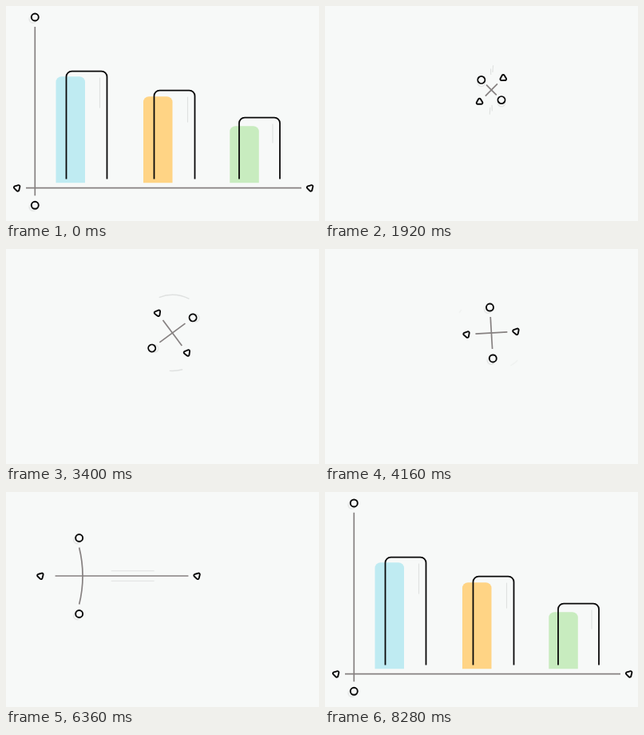
An HTML page with a canvas that plays this animation: 392x269 px, repeating every 8320 ms.

```html
<!DOCTYPE html>
<html lang="en">
<head>
<meta charset="utf-8">
<title>Bar chart loop</title>
<style>
html, body { margin: 0; width: 100%; height: 100%; overflow: hidden; background: #f7f9f8; }
canvas { display: block; width: 392px; height: 269px; }
</style>
</head>
<body>
<canvas id="stage"></canvas>
<script>
const W = 392, H = 269, LOOP = 8320, PX = 208.4, PY = 105;
const LAG = 20; // the lines follow their end marks by this many ms
const BG = '#f7f9f8', INK = '#080808', AXIS = '#868181', PALE = '#dfe1e0';
const rad = deg => deg * Math.PI / 180;

const canvas = document.getElementById('stage');
const ctx = canvas.getContext('2d');
const dpr = window.devicePixelRatio || 1;
canvas.width = W * dpr;
canvas.height = H * dpr;
ctx.scale(dpr, dpr);
ctx.lineJoin = 'round';

const clamp = u => Math.max(0, Math.min(1, u));
const part = (t, from, to) => clamp((t - from) / (to - from));
const sine = u => (1 - Math.cos(Math.PI * u)) / 2;
const swing = u => sine(u) + u * Math.sin(Math.PI * u) ** 2 / 2; // overshoots, then settles
const pulse = (t, from, to) => clamp(3 * Math.sin(Math.PI * part(t, from, to)));

// Poses: ends of both axes, where they cross, rotation, and the bars' lift off the axis.
const chart = { left: 14, right: 381, y: 227.6, x: 36.3, up: 14, down: 249.3, turn: 0, lift: 1 };
const cross = (h, v, shift = 0) =>
  ({ left: PX - h, right: PX + h, y: PY, x: PX + shift, up: PY - v, down: PY + v });

const phases = [
  [650, 950, { lift: 0 }, sine],
  [1000, 1920, cross(21, 17.8), sine],
  [1550, 1920, { turn: -45 }, sine],
  [1920, 2400, cross(31, 32), sine],
  [1920, 4300, { turn: 360 }, sine],
  [4480, 5080, { ...cross(31, 40.5, 17.8), turn: 374 }, sine],
  [5080, 5450, { ...cross(31, 47.5, 19), turn: 360 }, sine],
  [5900, 6760, { left: chart.left }, swing],
  [5900, 6858, { x: chart.x }, swing],
  [7000, 7540, { right: 387, y: 234, down: 255 }, sine],
  [7540, 8300, { ...chart, turn: 360 }, swing]
];

function poseAt(t) {
  const pose = { ...chart };
  for (const [from, to, goal, ease] of phases) {
    if (t <= from) continue;
    const k = ease(part(t, from, to));
    for (const key in goal) pose[key] += (goal[key] - pose[key]) * k;
  }
  return pose;
}

const bars = [
  { x: 62.5, ox: 75.5, color: '#bfebf2', fill: 133, line: 135, glint: 38 },
  { x: 172, ox: 185.5, color: '#ffd485', fill: 108, line: 111, glint: 32 },
  { x: 280.3, ox: 292, color: '#c8ecbf', fill: 71, line: 77, glint: 24 }
];

const barScale = (t, delay) => t < LOOP / 2
  ? 1 - sine(part(t - delay, 650, 1030))
  : swing(part(t - delay, 7000, 7700));

function stroke(color, width) {
  ctx.strokeStyle = color;
  ctx.lineWidth = width;
  ctx.stroke();
}

function line(x1, y1, x2, y2, color = PALE, width = 1.1) {
  ctx.beginPath();
  ctx.moveTo(x1, y1);
  ctx.lineTo(x2, y2);
  stroke(color, width);
}

function faint(alpha, draw) {
  if (alpha < .01) return;
  ctx.globalAlpha = alpha;
  draw();
  ctx.globalAlpha = 1;
}

function mark() {
  ctx.fillStyle = BG;
  ctx.fill();
  stroke(INK, 1.9);
}

function ring(x, y) {
  ctx.beginPath();
  ctx.arc(x - 2.5, y + 2.5, 4.6, 0, 7);
  stroke('#e6e8e7', 1.6);
  ctx.beginPath();
  ctx.arc(x, y, 4.5, 0, 7);
  mark();
}

function triangle(x, y) {
  const corner = i => [x + 5.8 * Math.cos(rad(120 * i - 166)), y + 5.8 * Math.sin(rad(120 * i - 166))];
  const [ax, ay] = corner(0), [bx, by] = corner(1);
  ctx.beginPath();
  ctx.moveTo((ax + bx) / 2, (ay + by) / 2);
  for (let i = 1; i <= 3; i++) ctx.arcTo(...corner(i), ...corner(i + 1), 1.6);
  ctx.closePath();
  mark();
}

function arch(x, w, y, h) {
  const r = Math.min(7, h);
  ctx.beginPath();
  ctx.moveTo(x, y);
  ctx.arcTo(x, y - h, x + r, y - h, r);
  ctx.arcTo(x + w, y - h, x + w, y, r);
  ctx.lineTo(x + w, y);
}

function drawBar(bar, i, t, { y, lift }) {
  const fill = bar.fill * barScale(t, 60 * i);
  const high = bar.line * barScale(t, 60 * i - 20);
  if (fill > .5) {
    arch(bar.x, 36.5, y - 4 - 2.3 * lift, fill);
    ctx.fillStyle = bar.color;
    ctx.fill();
  }
  if (high < 1) return;
  const base = y - 4 - 7 * lift, x = bar.ox + 42;
  arch(bar.ox, 51, base, high);
  stroke(INK, 1.8);
  const from = base - high + 36 - 28 * lift;
  const to = Math.min(base, from + bar.glint * (.36 + .64 * lift));
  if (from < to) line(x, from, x, to);
}

function drawTrails(t, { x, y, turn }) {
  faint(pulse(t, 1560, 2250), () => {
    for (let i = 0; i < 4; i++) {
      const a = rad(90 * i - (i % 2 ? 176 : 92)), near = i % 2 ? 22 : 19, far = near * 1.4;
      line(PX + near * Math.cos(a), PY + near * Math.sin(a), PX + far * Math.cos(a), PY + far * Math.sin(a));
    }
  });
  const spin = pulse(t, 2250, 4220);
  faint(spin, () => {
    for (const [end, size] of [[63, 47], [221, 20]]) {
      ctx.beginPath();
      ctx.arc(PX, PY, 47.5, rad(turn + end - size * spin), rad(turn + end));
      stroke(PALE, 1.4);
    }
  });
  faint(pulse(t, 6080, 6650), () => {
    for (const side of [-6.2, 6.2]) line(x + 40, PY + side, x + 94, PY + side);
  });
  faint(pulse(t, 7080, 7650), () => {
    for (const side of [-5.5, 5]) line(x + side, y - 79, x + side, y - 7);
  });
}

function drawAxes(t, pose) {
  const { left, right, y, x, up, down, turn } = pose, late = poseAt(t - LAG);
  const gapH = Math.min(11, (right - left) / 4), gapV = Math.min(12, (down - up) / 4);
  ctx.save();
  ctx.translate(PX, PY);
  ctx.rotate(rad(turn));
  ctx.translate(-PX, -PY);
  faint(pulse(t, 4600, 5300), () => line(x - 15, PY + 30, x - 3.5, PY + 30));
  line(late.left + gapH, y, late.right - gapH, y, AXIS, 1.7);
  ctx.beginPath();
  ctx.moveTo(x, late.up + gapV);
  ctx.quadraticCurveTo(late.x, (up + down) / 2, x, late.down - gapV);
  stroke(AXIS, 1.7);
  ring(x, up);
  ring(x, down);
  triangle(left, y);
  triangle(right, y);
  ctx.restore();
}

function draw(t) {
  const pose = poseAt(t);
  ctx.fillStyle = BG;
  ctx.fillRect(0, 0, W, H);
  drawTrails(t, pose);
  bars.forEach((bar, i) => drawBar(bar, i, t, pose));
  drawAxes(t, pose);
}

const start = performance.now();
function tick() {
  draw((performance.now() - start) % LOOP);
  requestAnimationFrame(tick);
}
tick();
</script>
</body>
</html>
```
